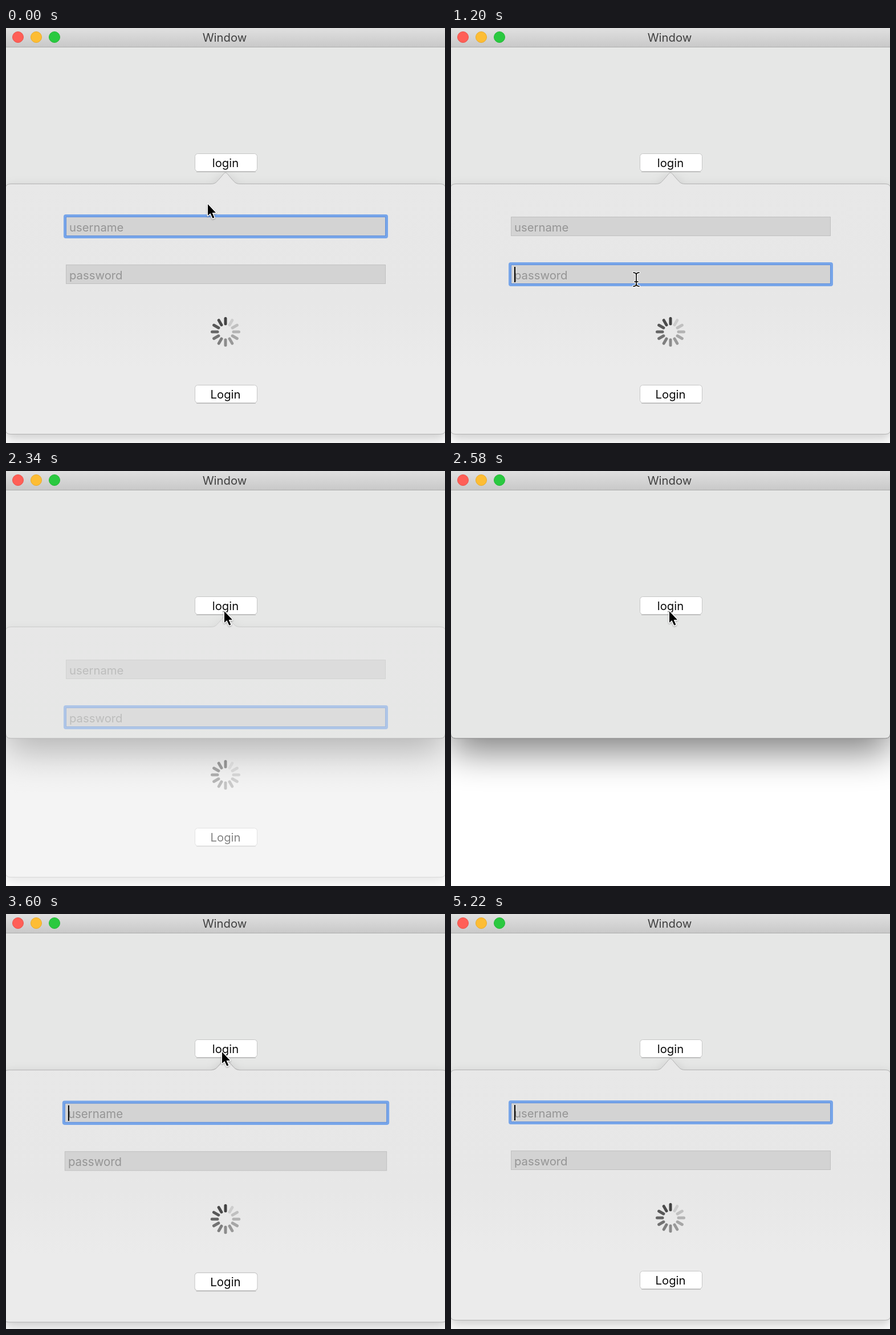
These frames come from a looping animation (770x728 px, 5.28 s). An HTML page:

```html
<!DOCTYPE html>
<html lang="en">
<head>
<meta charset="utf-8">
<title>Login popover</title>
<style>
  html, body { margin: 0; width: 100%; height: 100%; overflow: hidden; background: #fff; }
  svg { display: block; }
  text { font: 20.3px Inter, "Open Sans", sans-serif; fill: #0c0c0c; }
  .mid { text-anchor: middle; }
  .hint { fill: #959595; }
  .button { fill: #fff; stroke: #c6c6c6; }
  .field { fill: #d3d3d3; stroke: #c0c0c0; }
  .shape { fill: url(#sheet); stroke: #b2b2b2; filter: drop-shadow(0 8px 10px #0003); }
  #cursor path { stroke-linejoin: round; }
  #arrow { fill: #000; stroke: #fff; stroke-width: 3; paint-order: stroke; filter: drop-shadow(0 1px 1px #0005); }
</style>
</head>
<body>
<svg width="770" height="728" viewBox="0 0 770 728">
  <defs>
    <linearGradient id="bar" x2="0" y2="1">
      <stop stop-color="#e0e0e0"/><stop offset="1" stop-color="#c9c9c9"/>
    </linearGradient>
    <linearGradient id="sheet" x2="0" y2="1">
      <stop stop-color="#e8e8e8"/><stop offset=".5" stop-color="#e7e7e7"/>
      <stop offset=".75" stop-color="#ebebeb"/><stop offset="1" stop-color="#ebebeb"/>
    </linearGradient>
    <filter id="soft" x="-20%" y="-40%" width="140%" height="180%">
      <feGaussianBlur stdDeviation="32"/>
    </filter>
  </defs>

  <rect x="0" y="60" width="770" height="432" opacity=".5" filter="url(#soft)"/>
  <path d="M-.5 0H770.5V460Q770.5 469 761.5 469H8.5Q-.5 469 -.5 460Z" fill="#e6e7e6" stroke="#858585"/>
  <rect width="770" height="33" fill="url(#bar)"/>
  <path d="M0 33.5H770" stroke="#adadad"/>
  <g id="lights"></g>
  <text class="mid" x="383.5" y="24" style="fill:#404040">Window</text>
  <path d="M334 252.5H438" stroke="#0003"/>
  <rect id="opener" class="button" x="331.5" y="220.5" width="109" height="31" rx="5"/>
  <text id="openerText" class="mid" x="385" y="244">login</text>

  <g id="popover">
    <path class="shape" d="M8 273.5H360C368 273.5 370 269 374 265L382 255.5Q385 252 388 255.5L396 265C400 269 402 273.5 410 273.5H762Q771 273.5 771 282V704Q771 712.5 762 712.5H8Q-1 712.5 -1 704V282Q-1 273.5 8 273.5Z"/>
    <g id="fields"></g>
    <rect id="caret" x="111" width="2" height="27"/>
    <g id="spinner" stroke-width="5" stroke-linecap="round"></g>
    <path d="M334 658.5H438" stroke="#0003"/>
    <rect class="button" x="331.5" y="626.5" width="109" height="31" rx="5"/>
    <text class="mid" x="385" y="650">Login</text>
  </g>

  <g id="cursor">
    <path id="arrow" d="M1 2V22L5.4 18L9.4 26.8L12.4 25.5L8.6 17H15Z"/>
    <g id="beam" fill="none" stroke-linecap="round">
      <path d="M-5 -12Q0 -12 0 -8Q0 -12 5 -12M0 -8V8M-5 12Q0 12 0 8Q0 12 5 12M-3 4H3" stroke="#fff" stroke-width="4.2"/>
      <path d="M-5 -12Q0 -12 0 -8Q0 -12 5 -12M0 -8V8M-5 12Q0 12 0 8Q0 12 5 12M-3 4H3" stroke="#111" stroke-width="1.8"/>
    </g>
  </g>
</svg>

<script>
const LOOP = 5280, STEP = 60;
const TIP = { x: 385, y: 253 };           // popover grows from its arrow tip
const FOCUS_AT = 780, CLOSE_AT = 2280, PRESS_AT = 3180, OPEN_AT = 3360;
const BLINK = 480, RING_MS = 240;
const FIELD_Y = [331.5, 415.5];
const PATH = [                            // time, x, y of the pointer
  [0, 353, 307], [540, 310, 425], [1080, 310, 425], [1560, 406, 528],
  [1800, 409, 512], [2220, 382, 244], [2760, 382, 244], [2940, 386, 272],
  [3120, 380, 206], [3240, 378, 240], [3840, 378, 240], [4320, 350, 661],
  [4380, 348, 790], [LOOP, 348, 790]
];

const $ = id => document.getElementById(id);
const clamp = v => Math.max(0, Math.min(1, v));
const set = (el, attrs) => Object.entries(attrs).forEach(([k, v]) => el.setAttribute(k, v));
const show = (el, on) => set(el, { visibility: on ? "visible" : "hidden" });

$("lights").innerHTML = [["#ff5f57", "#ec5149"], ["#fdbd34", "#e9ab2a"], ["#2ac940", "#22b835"]]
  .map(([fill, edge], i) => `<circle cx="${21 + 32 * i}" cy="16" r="9.5" fill="${fill}" stroke="${edge}"/>`).join("");

$("fields").innerHTML = ["username", "password"].map((hint, i) => `
  <rect class="ring"/>
  <rect class="field" x="105.5" y="${FIELD_Y[i]}" width="560" height="33"/>
  <text class="hint" x="111" y="${FIELD_Y[i] + 25.5}">${hint}</text>`).join("");
const rings = document.querySelectorAll(".ring"), boxes = document.querySelectorAll(".field");

$("spinner").innerHTML = Array.from({ length: 12 }, (_, i) => {
  const g = i ? 218 - 13 * i : 66;
  return `<path d="M385 519V509.5" stroke="rgb(${g},${g},${g})" transform="rotate(${30 * i} 385 533)"/>`;
}).join("");

function pointerAt(t) {
  const i = PATH.findIndex(k => k[0] > t);
  const [t0, x0, y0] = PATH[i - 1], [t1, x1, y1] = PATH[i];
  const p = (t - t0) / (t1 - t0), e = p * p * (3 - 2 * p);
  return { x: x0 + (x1 - x0) * e, y: y0 + (y1 - y0) * e };
}

function drawPopover(t) {
  const age = t - OPEN_AT;
  const scale = age < 0 ? 1 : 1 - 0.642 * Math.exp(-0.01755 * age) * Math.cos(0.0157 * age);
  const alpha = age < 0 ? 1 - clamp((t - CLOSE_AT + STEP) / 240) : clamp(0.36 + age / 150);
  set($("popover"), {
    opacity: alpha,
    transform: `translate(${TIP.x} ${TIP.y}) scale(${scale}) translate(${-TIP.x} ${-TIP.y})`
  });
  return alpha > 0;
}

// The focus ring starts wide, grey and faint, then tightens into solid blue.
function drawFocus(t) {
  const active = t >= FOCUS_AT && t < OPEN_AT ? 1 : 0;
  const start = t < FOCUS_AT ? -RING_MS : t < OPEN_AT ? FOCUS_AT : OPEN_AT - STEP;
  const p = clamp((t - start) / RING_MS);
  const grow = 4 + 24 * (1 - p) ** 2;
  rings.forEach((ring, i) => {
    const on = i === active;
    set(ring, {
      x: 105 - grow, y: FIELD_Y[i] - 0.5 - grow,
      width: 561 + 2 * grow, height: 34 + 2 * grow,
      rx: grow, fill: `hsl(216, ${72 * p}%, 69%)`,
      opacity: on ? 0.1 + 0.9 * p ** 3 : 0
    });
    boxes[i].style.stroke = on && p === 1 ? "#5f8fdc" : "";
  });
  const blinkFrom = t < FOCUS_AT ? -BLINK : start;
  const lit = Math.floor((t - blinkFrom) / BLINK) % 2 === 0;
  set($("caret"), { y: FIELD_Y[active] + 3.5, opacity: lit ? 1 : 0 });
}

function drawPointer(t, open) {
  const { x, y } = pointerAt(t);
  const typing = open && x > 105 && x < 666 && FIELD_Y.some(top => y > top && y < top + 33);
  set($("cursor"), { transform: `translate(${x} ${y})` });
  show($("arrow"), !typing);
  show($("beam"), typing);
}

function frame(now) {
  const t = Math.floor((now % LOOP) / STEP) * STEP;
  const pressed = t >= PRESS_AT && t < PRESS_AT + 2 * STEP;
  $("opener").style.fill = pressed ? "#3f8cf4" : "";
  $("openerText").style.fill = pressed ? "#fff" : "";
  const open = drawPopover(t);
  drawFocus(t);
  drawPointer(t, open);
}

const begin = performance.now();
(function tick() {
  frame(performance.now() - begin);
  requestAnimationFrame(tick);
})();
</script>
</body>
</html>
```
